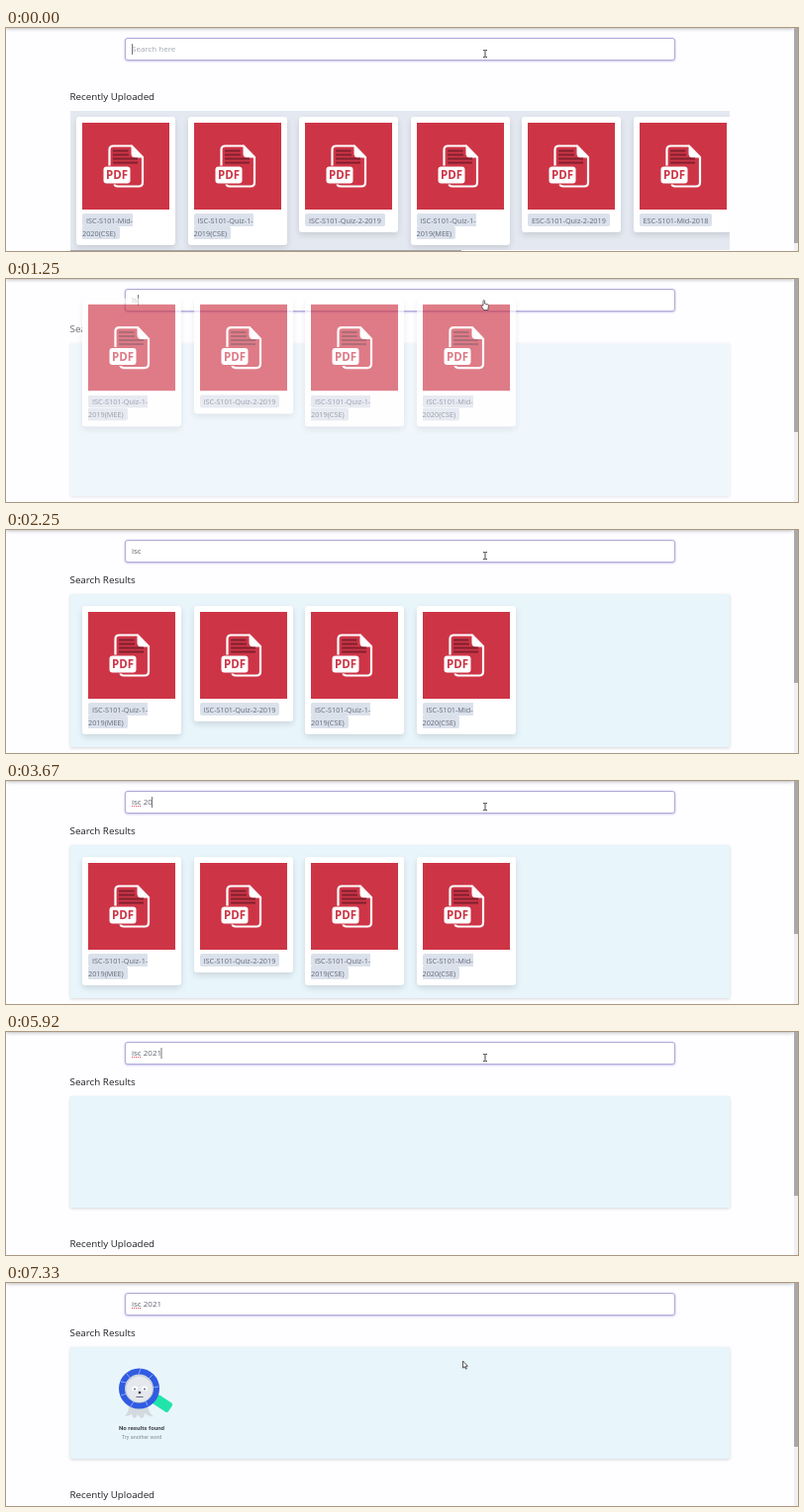
Animation, 800 px wide and 226 px high, one loop 7410 ms. Source, as an HTML page:

```html
<!DOCTYPE html>
<html lang="en">
<head>
<meta charset="utf-8">
<title>PDF search</title>
<style>
html, body { margin: 0; width: 100%; height: 100%; overflow: hidden; background: #fefdff; }
body { position: relative; font-family: "Open Sans", "Noto Sans", sans-serif; color: #1d2026; }
#stage { position: absolute; left: 0; top: 0; width: 800px; height: 226px; overflow: hidden; }
#stage div, #stage > svg, .empty svg { position: absolute; }
.step { animation: 7410ms step-end infinite; }
.smooth { animation: 7410ms linear infinite; }

.header { left: 0; top: -4px; width: 796px; height: 4px; box-shadow: 0 0 4px rgba(0,0,0,.4); }
.track { left: 796px; top: 0; width: 4px; height: 226px; background: #f0f0f1; }
.thumb { left: 0; top: 0; width: 4px; background: #a9a9ab; animation-name: thumb; }

.search { left: 120px; top: 10px; width: 554px; height: 21px; border: 1px solid #b1abd5; border-radius: 3px;
  background: #fff; box-shadow: 0 0 2px rgba(120,100,215,.3), 0 1px 2px rgba(120,100,215,.25); }
.line { top: 4.3px; left: 6px; height: 12px; font-size: 8px; line-height: 12px; white-space: pre; }
.hint { color: #a3a8b3; animation-name: hint; }
.query { color: #5d626c; overflow: hidden; animation-name: type; }
.caret { left: 6.4px; top: 5px; width: 1px; height: 11px; background: #777; animation-name: move, blink; }
.typo { left: 6px; top: 14px; width: 9px; height: 0; border-bottom: 1px dotted #e0404e; animation-name: typo; }

.title { left: 64.5px; height: 14px; font-size: 9.8px; line-height: 14px; white-space: nowrap; }
.recent { left: 0; top: 0; width: 800px; height: 226px; animation-name: push; }
.recent .title { top: 63px; }
.shelf { left: 65px; top: 84px; width: 666px; height: 141px; background: #e4e9f1; overflow: hidden; }
.bar { left: 65px; top: 225px; width: 395px; height: 2px; background: #a3a6ab; }
.results { left: 0; top: 0; width: 800px; height: 226px; animation-name: fade; }
.results .title { top: 44px; }
.panel { left: 65px; top: 65px; width: 666px; background: #e8f5fb; box-shadow: 0 1px 3px rgba(0,0,0,.16); animation-name: shrink; }
.slide { left: 0; top: 0; animation-name: slide; }
.row { display: flex; gap: 12.5px; align-items: flex-start; }
.recent .row { left: 6px; top: 6px; }
.results .row { left: 77px; top: 77px; animation-name: leave; }
#stage .card { position: static; flex: none; box-sizing: border-box; width: 100px; padding: 6px; border-radius: 3px;
  background: #fff; box-shadow: 0 3px 6px rgba(0,0,0,.12); font-size: 7.3px; line-height: 12.5px; color: #626b7b; white-space: nowrap; }
.card svg { display: block; width: 88px; height: 88px; margin-bottom: 4.5px; }
.card span { padding: 1.5px 4px; border-radius: 2px; background: #dbe1eb; }

.empty { left: 0; top: 0; width: 200px; height: 170px; animation-name: empty; }
.empty text { font-family: Roboto, sans-serif; text-anchor: middle; }
.face { animation-name: look; }

.beam { animation-name: beam; }
.hand { animation-name: hand; }
.arrow { animation-name: arrow, glide; animation-duration: 7410ms; animation-iteration-count: infinite;
  animation-timing-function: step-end, linear; }

@keyframes thumb { 0% { height: 218px } 11.2% { height: 155px } 78.68%, 100% { height: 166px } }
@keyframes hint { 0% { opacity: 1 } 11.2%, 100% { opacity: 0 } }
@keyframes type {
  0% { width: 0 } 11.2% { width: 2.1px } 15.79% { width: 5.8px } 19.16% { width: 9.7px } 37.11% { width: 11.8px }
  41.57% { width: 16.3px } 44.94% { width: 20.9px } 59.65% { width: 25.5px } 65.18%, 100% { width: 31px }
}
@keyframes move {
  0% { transform: none } 11.2% { transform: translateX(2px) } 15.79% { transform: translateX(6px) }
  19.16% { transform: translateX(9px) } 37.11% { transform: translateX(11px) } 41.57% { transform: translateX(16px) }
  44.94% { transform: translateX(20px) } 59.65% { transform: translateX(25px) } 65.18%, 100% { transform: translateX(29.5px) }
}
@keyframes blink {
  0%, 11.2%, 33.47%, 59.65%, 79.49% { opacity: 1 }
  7.15%, 26.32%, 52.09%, 72.33%, 86.64%, 100% { opacity: 0 }
}
@keyframes typo { 0% { opacity: 0 } 37.11%, 100% { opacity: 1 } }
@keyframes push { 0% { transform: none } 11.2% { transform: translateY(187px) } 78.68%, 100% { transform: translateY(145px) } }
@keyframes fade { 0% { opacity: 0 } 12.35% { opacity: 0; animation-timing-function: ease } 24.36%, 100% { opacity: 1 } }
@keyframes slide {
  0% { transform: translateY(-150px) }
  12.01% { transform: translateY(-150px); animation-timing-function: ease }
  25.64%, 100% { transform: none }
}
@keyframes shrink { 0% { height: 155px } 78.68%, 100% { height: 113px } }
@keyframes leave { 0% { visibility: visible } 78.68%, 100% { visibility: hidden } }
@keyframes empty { 0%, 81.65% { opacity: 0 } 86.37%, 100% { opacity: 1 } }
@keyframes look { 0%, 86% { transform: translateX(-1px) } 92% { transform: translateX(1px) } 98%, 100% { transform: none } }
@keyframes beam { 0%, 17.41% { opacity: 1 } 11.2%, 93.12%, 100% { opacity: 0 } }
@keyframes hand { 0%, 17.41%, 100% { opacity: 0 } 11.2% { opacity: 1 } }
@keyframes arrow { 0% { opacity: 0 } 93.12%, 100% { opacity: 1 } }
@keyframes glide {
  0% { transform: translate(22px, -43px) }
  93.12% { transform: translate(22px, -43px); animation-timing-function: ease-out }
  97.17%, 100% { transform: none }
}
</style>
</head>
<body>
<svg width="0" height="0" style="position:absolute">
  <symbol id="pdf" viewBox="0 0 88 88">
    <path fill="#cd3546" d="M0 0h88v88H0z"/>
    <path fill="none" stroke="#fff" stroke-width="2.2" d="M27.5 45V27.5q0-4 4-4H50L61 35v25.5q0 4-4 4H36q-3.5 0-3.5-3"/>
    <path fill="#fff" d="M49.5 22.3 62.2 35.500H54q-4.5 0-4.5-4.5z"/>
    <path stroke="#81202f" stroke-width="2" d="M31 28.5h15.500M31 32.5h16M31 36.5h25M31 40.5h25"/>
    <rect x="20.5" y="43.5" width="29" height="19" rx="4" fill="#cd3546"/>
    <rect x="21.5" y="44.5" width="27" height="17" rx="3" fill="#fff"/>
    <text x="35" y="57.2" text-anchor="middle" font-family="Open Sans, sans-serif" font-size="11.5" font-weight="700" fill="#cd3546">PDF</text>
  </symbol>
</svg>

<div id="stage">
  <div class="recent step">
    <div class="title">Recently Uploaded</div>
    <div class="shelf"><div class="row" id="recent"></div></div>
    <div class="bar"></div>
  </div>
  <div class="header"></div>
  <div class="search">
    <div class="line hint step">Search here</div>
    <div class="line query step">isc 2021</div>
    <div class="typo step"></div>
    <div class="caret step"></div>
  </div>
  <div class="results smooth">
    <div class="title">Search Results</div>
    <div class="panel step"></div>
    <div class="slide smooth"><div class="row step" id="found"></div></div>
    <div class="empty smooth">
      <svg width="200" height="170">
        <path fill="#d3d9df" d="M124 122q1 8-4 13 5 0 7-3 0 4 3 5 2-1 3-4 2 4 5 4 2-2 2-5 4 4 9 3-6-4-6-13z"/>
        <path stroke="#b9c2cc" stroke-width="5" d="M147 114l6 4"/>
        <rect x="-9.5" y="-5.5" width="19" height="11" rx="2.5" fill="#20e4aa" transform="translate(158 122) rotate(33)"/>
        <circle cx="134.5" cy="107" r="17.5" fill="#cbd2db" stroke="#315be2" stroke-width="6"/>
        <path fill="none" stroke="#b4c5ff" stroke-width=".7" d="M116 100l6 1M122 92l4 5M136 87l-2 5M148 93l-4 4M154 105l-6 1M116 114l6-2M126 125l3-5M143 124l-2-4"/>
        <circle cx="134.5" cy="107.5" r="13" fill="#e5e8ec"/>
        <g class="face smooth">
          <ellipse cx="130" cy="107" rx="3.2" ry="2.5" fill="#fff"/>
          <ellipse cx="140" cy="107" rx="3.2" ry="2.5" fill="#fff"/>
          <circle cx="130" cy="107.5" r=".9" fill="#586070"/>
          <circle cx="140" cy="107.5" r=".9" fill="#586070"/>
          <circle cx="135" cy="111" r="1.3" fill="#343b48"/>
          <path stroke="#626b78" d="M131.5 115.5h7"/>
        </g>
        <text x="137" y="149.2" font-size="6.2" font-weight="700" fill="#3f444b">No results found</text>
        <text x="137.2" y="158.3" font-size="5.4" fill="#858b94">Try another word</text>
      </svg>
    </div>
  </div>
  <div class="track"><div class="thumb step"></div></div>

  <svg class="beam step" width="800" height="226" fill="none" stroke="#333">
    <path d="M482 22.5h1.5l.5.5.5-.5h1.5M484 23v6M482 29.5h1.5l.5-.5.5.5h1.5" stroke-width=".9"/>
  </svg>
  <svg class="hand step" width="800" height="226">
    <path fill="#fff" stroke="#444" stroke-width=".8" stroke-linejoin="round" d="M482 27v-4.5q0-1 .8-1t.8 1V25l3 .8q.9.3.8 1.2l-.6 4.5h-4l-2.5-3.5q-.4-1 .5-1.2z"/>
  </svg>
  <svg class="arrow" width="800" height="226">
    <path fill="#fff" stroke="#333" stroke-width=".8" stroke-linejoin="round" d="M461.5 79v7.2l1.6-1.5 1.3 2.5 1-.5-1.2-2.4h2.2z"/>
  </svg>
</div>

<script>
const mid = "ISC-S101-Mid-<br>2020(CSE)";
const quiz = dept => `ISC-S101-Quiz-1-<br>2019(${dept})`;
const quiz2 = "ISC-S101-Quiz-2-2019";

function fill(id, labels) {
  document.getElementById(id).innerHTML = labels.map(label =>
    `<div class="card"><svg><use href="#pdf"/></svg><span>${label}</span></div>`).join("");
}

fill("recent", [mid, quiz("CSE"), quiz2, quiz("MEE"), "ESC-S101-Quiz-2-2019", "ESC-S101-Mid-2018"]);
fill("found", [quiz("MEE"), quiz2, quiz("CSE"), mid]);
</script>
</body>
</html>
```
